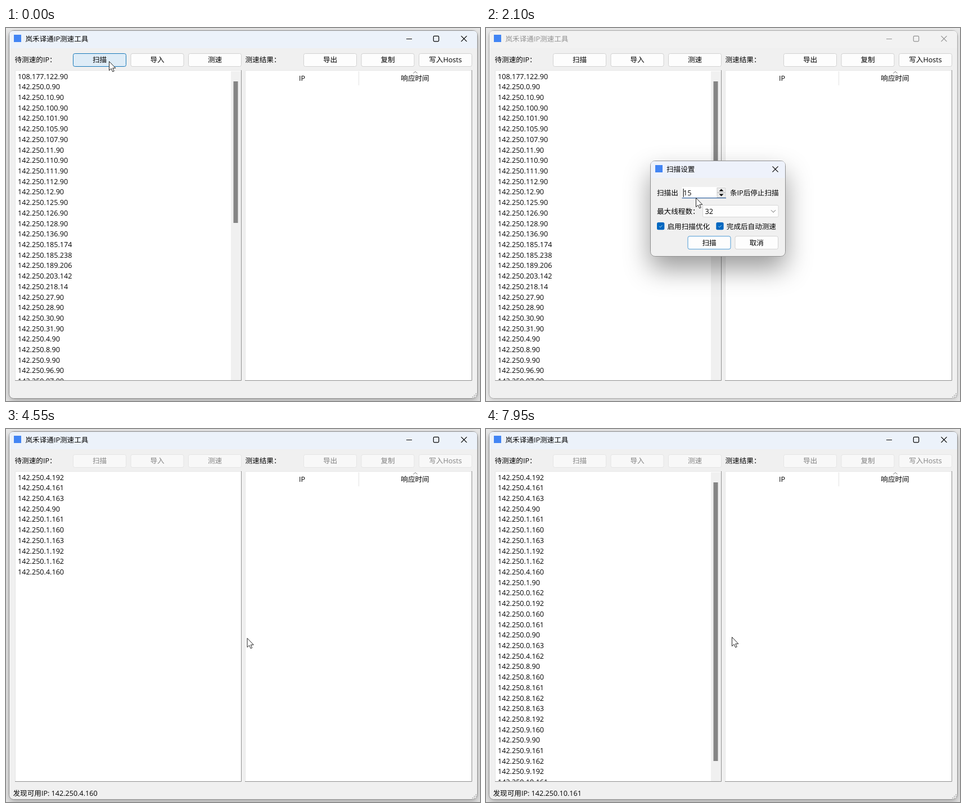
Write an HTML page that moves like this. It is 843 px wide and 664 px high and loops after 8000 ms.

```html
<!DOCTYPE html>
<html lang="zh-CN">
<head>
<meta charset="utf-8">
<style>
  html, body { margin: 0; height: 100%; overflow: hidden; background: #e9e9e9; }
  svg { display: block; width: 843px; height: 664px; }
  text {
    font: 12.6px "Open Sans", "Noto Sans CJK SC", "Noto Sans CJK", sans-serif;
    text-rendering: geometricPrecision;
    white-space: pre;
  }
</style>
</head>
<body>
<svg id="stage" viewBox="0 0 843 664">
  <defs>
    <filter id="activeShadow" x="-10%" y="-10%" width="120%" height="120%">
      <feDropShadow dx="0" dy="5" stdDeviation="7" flood-opacity=".28"/>
    </filter>
    <filter id="inactiveShadow" x="-10%" y="-10%" width="120%" height="120%">
      <feDropShadow dx="0" dy="3" stdDeviation="5" flood-opacity=".14"/>
    </filter>
    <filter id="dialogShadow" x="-50%" y="-50%" width="200%" height="220%">
      <feDropShadow dx="0" dy="22" stdDeviation="23" flood-opacity=".39"/>
    </filter>
    <clipPath id="listClip"><rect x="17" y="77" width="401" height="550"/></clipPath>
  </defs>
</svg>
<script>
const LOOP = 8000;
const ROW_HEIGHT = 18.71;
const BLUE = '#0067c0';
const OPEN = 750, CLOSED = 4000;

// Subnets without a host part end in .90.
const savedIps = ['108.177.122.90',
  ...('0 10 100 101 105 107 11 110 111 112 12 125 126 128 136 185.174 185.238 189.206 203.142 218.14 ' +
    '27 28 30 31 4 8 9 96 97').split(' ').map(tail => '142.250.' + (tail.includes('.') ? tail : tail + '.90'))];
const foundIps = ('4:192,161,163,90 1:161,160,163,192,162 4:160 1:90 0:162,192,160,161,90,163 4:162 ' +
  '8:90,160,161,162,163,192 9:160,90,161,162,192 10:161').split(' ').flatMap(group => {
  const [subnet, hosts] = group.split(':');
  return hosts.split(',').map(host => `142.250.${subnet}.${host}`);
});

// Key points: time, then the values at that time.
const foundCount = [[4100, 0], [4550, 10], [5750, 22], [6500, 24], [6750, 24], [6950, 28], [7400, 28], [7900, 30]];
const pointerPath = [[1100, 183, 60], [1950, 373, 303], [2200, 373, 303], [2400, 374, 296],
  [3300, 374, 296], [3650, 401, 383], [3900, 401, 383], [4500, 428, 373], [4850, 437, 371]];
const edits = ['15', '15', '1', '', '3', '30'];

const linear = u => u;
const smooth = u => u * u * (3 - 2 * u);
function valuesAt(points, t, ease) {
  const next = points.findIndex(([at]) => at > t);
  if (next < 0) return points.at(-1).slice(1);
  const [t0, ...from] = points[Math.max(next - 1, 0)], [t1, ...to] = points[next];
  const k = next ? ease((t - t0) / (t1 - t0)) : 0;
  return from.map((value, i) => value + (to[i] - value) * k);
}

const rect = (x, y, w, h, fill, extra = '') =>
  `<rect x="${x}" y="${y}" width="${w}" height="${h}" fill="${fill}" ${extra}/>`;
const path = (d, stroke, extra = '') => `<path d="${d}" fill="none" stroke="${stroke}" ${extra}/>`;
// Text is placed by its vertical centre.
const label = (x, y, content, fill = '#000', anchor = 'start') =>
  `<text x="${x}" y="${y + 4.6}" fill="${fill}" text-anchor="${anchor}">${content}</text>`;
const cross = (x, y, color) => path(`M${x - 5} ${y - 5}l10 10m0 -10l-10 10`, color, 'stroke-width="1.2"');

const buttonLooks = {
  normal: ['#fdfdfd', '#d2d2d2', '#000'],
  disabled: ['#f8f8f8', '#e5e5e5', '#838383'],
  hover: ['#deecf7', '#1677b8', '#000'],
  preset: ['#fdfdfd', '#4d9bd6', '#000'],
};
function button(x, y, width, content, look) {
  const [fill, stroke, color] = buttonLooks[look];
  return rect(x + .5, y + .5, width - 1, 23, fill, `rx="3" stroke="${stroke}"`) +
    label(x + width / 2, y + 11.7, content, color, 'middle');
}

function resizeGrip() {
  let dots = '';
  for (let row = 0; row < 3; row++)
    for (let i = 0; i <= row; i++) dots += rect(835 - 3 * i, 650 + 3 * row, 2, 2, '#bcbcbc');
  return dots;
}

function windowFrame(active) {
  const ink = active ? '#000' : '#929292';
  return `<g filter="url(#${active ? 'activeShadow' : 'inactiveShadow'})">` +
    rect(5.5, 4.5, 833, 655, '#f0f0f0', `rx="8" stroke="${active ? '#8b8b8b' : '#a8a8a8'}"`) + '</g>' +
    `<path d="M6 36V12q0 -7 7 -7H831q7 0 7 7V36Z" fill="${active ? '#ecf2fa' : '#f2f2f2'}"/>` +
    rect(14, 12, 13, 13, '#4285f4') +
    label(34.5, 19.3, '岚禾译通IP测速工具', ink) +
    path('M712 19.5h10', ink) +
    rect(760.3, 14.4, 9.4, 9.4, 'none', `rx="1.5" stroke="${ink}" stroke-width="1.2"`) +
    cross(814.5, 19.2, ink) + resizeGrip();
}

function toolbar(look, scanLook) {
  const group = (x, names) => names.map((name, i) =>
    button(x + i * 102.5, 45, 95, name, name === '扫描' ? scanLook : look)).join('');
  return label(15.5, 56.5, '待测速的IP：') + group(119, ['扫描', '导入', '测速']) +
    label(425.5, 56.5, '测速结果：') + group(529, ['导出', '复制', '写入Hosts']);
}

function panel(left, right) {
  return rect(left, 75, right - left, 553, '#fff') +
    path(`M${left + .5} 627V75.5H${right}`, '#e6e6e6') +
    path(`M${left} 627.5H${right - .5}V75`, '#8f8f8f');
}

function ipList(ips, thumbBottom) {
  const rows = ips.map((ip, i) => label(21, 86 + i * ROW_HEIGHT, ip)).join('');
  const scrollbar = rect(400, 77, 18, 550, '#f0f0f0') + rect(404.5, 95, 8, thumbBottom - 95, '#858585');
  return panel(16, 419) + `<g clip-path="url(#listClip)">${rows}</g>` + (thumbBottom ? scrollbar : '');
}

function resultTable() {
  return panel(425, 829) + path('M627.5 77V102', '#e3e3e3') +
    path('M724.5 80.5l3.5 -3l3.5 3', '#777') +
    label(526.5, 89, 'IP', '#000', 'middle') + label(727.5, 89, '响应时间', '#000', 'middle');
}

function spinBox(t) {
  const step = Math.max(0, Math.min(edits.length - 1, Math.floor((t - 2200) / 210)));
  const value = edits[step];
  const caretX = 350.6 + (step ? value.length * 7.3 : 0);
  const blinkStart = step ? 2200 + step * 210 : 800;
  const caretOn = Math.floor((t - blinkStart) / 530) % 2 === 0;
  const hovered = t >= 1900 && t < 3360;
  const arrow = (y, dir) =>
    rect(411, y, 15, 8, '#ececec', 'stroke="#cdcdcd"') +
    `<path d="M414.5 ${y + 4 + 2 * dir}h8l-4 ${-4 * dir}z"/>`;
  return rect(348.5, 283, 78.5, 20, '#fff') + arrow(284.5, 1) + arrow(293.5, -1) +
    (hovered ? rect(348.5, 302, 78.5, 1.2, '#2c5f9e') : rect(348.5, 301.6, 78.5, 2, BLUE)) +
    label(351, 293.3, value) + (caretOn ? rect(caretX, 286, 1.1, 15, '#000') : '');
}

const checkBox = (x, content) =>
  rect(x, 346, 13.3, 13.3, BLUE, 'rx="2.5"') +
  path(`M${x + 4} 352.8l2 2l3.4 -3.6`, '#d5e5f4', 'stroke-width=".9"') + label(x + 18.5, 353, content);

function dialog(t) {
  const opening = 1 - (1 - Math.min((t - OPEN) / 350, 1)) ** 3;
  const closing = Math.max(0, 1 - (CLOSED - t) / 120);
  const scale = .9 + .1 * opening - .06 * closing;
  return `<g opacity="${opening * (1 - closing)}"
      transform="translate(412 321) scale(${scale}) translate(-412 -321)">` +
    '<g filter="url(#dialogShadow)">' +
    rect(292.5, 236.5, 240, 170, '#f0f0f0', 'rx="8" stroke="#8f8f8f"') + '</g>' +
    '<path d="M293 267V244q0 -7 7 -7H525q7 0 7 7V267Z" fill="#eef2fb"/>' +
    rect(301, 244, 13, 13, '#4285f4') + label(321, 251.3, '扫描设置') + cross(514.5, 251.3, '#000') +
    label(304, 293.3, '扫描出') + spinBox(t) + label(434, 293.3, '条IP后停止扫描') +
    label(304, 326, '最大线程数：') +
    rect(385.5, 315.5, 134.5, 21, '#fdfdfd', 'rx="2" stroke="#d6d6d6"') +
    label(389.5, 326, '32') + path('M507 324.2l4 4l4 -4', '#666') +
    checkBox(304, '启用扫描优化') + checkBox(409.3, '完成后自动测速') +
    button(358.5, 370.2, 77, '扫描', t >= 3600 ? 'hover' : 'preset') +
    button(442.5, 370.2, 77.5, '取消', 'normal') + '</g>';
}

function pointer(t) {
  return `<path transform="translate(${valuesAt(pointerPath, t, smooth)})"
    d="M.5 -.5V15.6L4.2 12.2L6.7 17.8L9.2 16.7L6.8 11.3H11.8Z" fill="#fff" stroke="#222"/>`;
}

function scene(t) {
  const scanning = t >= CLOSED;
  const beforeClick = t < 700;
  const found = foundIps.slice(0, Math.floor(valuesAt(foundCount, t, linear)[0]));
  const look = scanning ? 'disabled' : 'normal';
  const thumbBottom = !scanning ? 347 : found.length === foundIps.length ? 591 : 0;
  return windowFrame(beforeClick || scanning) + toolbar(look, beforeClick ? 'hover' : look) +
    ipList(scanning ? found : savedIps, thumbBottom) + resultTable() +
    (found.length ? label(12.5, 648.5, '发现可用IP: ' + found.at(-1)) : '') +
    (t >= OPEN && !scanning ? dialog(t) : '') + pointer(t);
}

const layer = document.createElementNS('http://www.w3.org/2000/svg', 'g');
document.getElementById('stage').append(layer);

function draw() {
  layer.innerHTML = scene(performance.now() % LOOP);
  requestAnimationFrame(draw);
}
draw();
</script>
</body>
</html>
```
